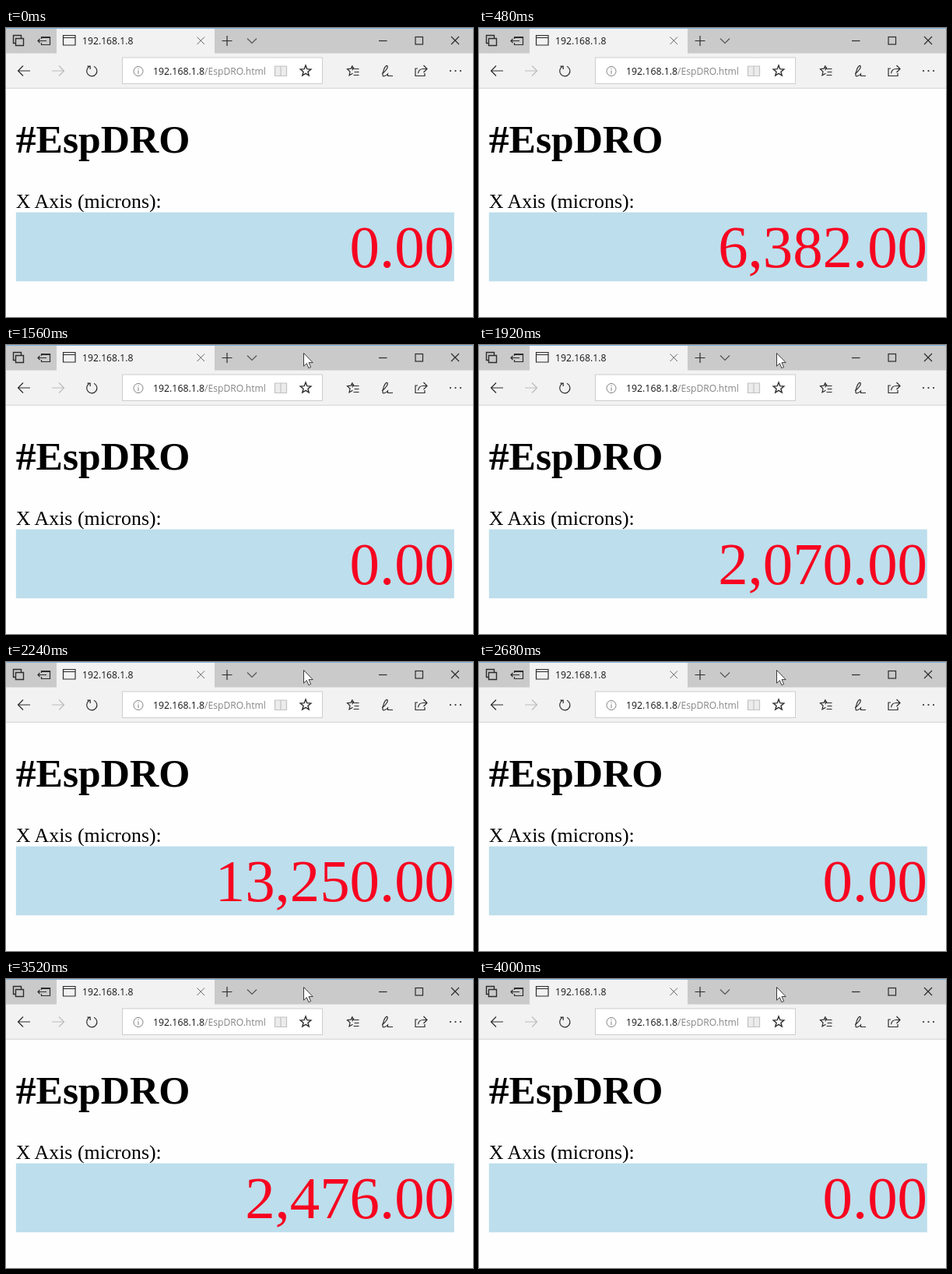
An HTML page for the animation above (4200 ms loop, 600 px wide and 371 px high).

```html
<!DOCTYPE html>
<html lang="en">
<head>
<meta charset="utf-8">
<title>Axis readout</title>
<style>
  html, body { margin: 0; width: 100%; height: 100%; overflow: hidden; background: #fefefe; }
  svg { display: block; width: 600px; height: 371px; }
  .page { font-family: "Liberation Serif", "Times New Roman", serif; fill: #000; }
  .ui { font-family: "Open Sans", "Noto Sans", sans-serif; fill: #151515; }
  .icon { fill: none; stroke: #2c2c2c; stroke-width: 1.2; }
</style>
</head>
<body>
<svg viewBox="0 0 600 371">
  <rect width="600" height="371" fill="#fefefe"/>

  <!-- tab strip -->
  <rect width="600" height="33" fill="#cacaca"/>
  <rect width="600" height="1" fill="#82b3dc"/>
  <rect y="32.5" width="600" height="44.5" fill="#f2f2f2"/>
  <rect x="65" y="1" width="203" height="32" fill="#f2f2f2"/>
  <path d="M0 77.3H600" stroke="#d3d3d3"/>
  <g class="icon">
    <path d="M12.5 13.5H22.5V22.5H12.5ZM12.5 19.5H9.5V9.5H19.5V13.5" stroke-width="1.4"/>
    <path d="M45.5 14V11.5H56.5V21.5H45.5V19M45.5 12.5H56.5M41 16.5H52M43.5 14L41 16.5L43.5 19"/>
    <path d="M73.5 9.5H89V22H73.5ZM73.5 12.5H89"/>
    <path d="M245.5 11.5L255 21M255 11.5L245.5 21" stroke="#666" stroke-width="1"/>
    <path d="M277.5 16.5H290.5M284 10V23"/>
    <path d="M310 13.5L316 19.5L322 13.5" stroke="#555"/>
    <path d="M479 16.5H489.5"/>
    <rect x="526" y="11.5" width="9.5" height="9.5"/>
    <path d="M572 11L582 21M582 11L572 21"/>
  </g>
  <text class="ui" x="98" y="21" font-size="12.2">192.168.1.8</text>

  <!-- toolbar -->
  <rect x="149.5" y="38" width="257" height="33.5" fill="#fff" stroke="#cdcdcd"/>
  <g class="icon">
    <path d="M31 55H15.5M22 48.5L15.5 55L22 61.5"/>
    <path d="M59 55H74.5M68 48.5L74.5 55L68 61.5" stroke="#bcbcbc"/>
    <path d="M107 49.5A6.6 6.6 0 1 0 113 49.2M104.5 49.2H108.2V53"/>
    <g stroke="#808080" stroke-width="1">
      <circle cx="170" cy="55.5" r="6"/>
      <path d="M170 54.3V59M170 51.8V53"/>
    </g>
    <path d="M345.5 49H360.5V61.5H345.5ZM353 49V61.5" fill="#ececec" stroke="#c2c2c2"/>
    <path id="star" stroke-width="1.4"/>
    <path d="M447 50.3L445.3 53.3L445 48.2L443.2 52.2L438.5 52.7L442 56L441 60.8L445.5 58.3M446.5 52.5H453.5M447.5 56.5H453.5M446.5 60.5H453.5"/>
    <path d="M483 58.5C488 56 492 49 489.5 48.3C486.5 48 483.5 58 484 61C484.3 63 489 61 490.5 59V61.5H497"/>
    <path d="M529 52H526V61.5H538V58M529.5 58.3C530 54.3 533 52.5 536 52.5H540.5M536.5 48L541 52.5L536.5 57"/>
  </g>
  <g fill="#2c2c2c">
    <circle cx="571" cy="55" r="1.1"/><circle cx="577.5" cy="55" r="1.1"/><circle cx="584" cy="55" r="1.1"/>
  </g>
  <text class="ui" x="189" y="60" font-size="12.3">192.168.1.8<tspan fill="#858585" font-size="12.1">/EspDRO.html</tspan></text>

  <!-- page -->
  <g class="page">
    <text x="12.8" y="160" font-size="51.6" font-weight="bold">#EspDRO</text>
    <text x="12.8" y="230.6" font-size="25.9">X Axis (microns):</text>
    <rect x="12.8" y="236.6" width="563" height="88.6" fill="#bddeec"/>
    <text id="readout" x="576" y="307" font-size="76.8" text-anchor="end" fill="#f60420">0.00</text>
  </g>

  <path id="cursor" d="M382.5 10.5V27.2L386.3 23.6L388.9 29.6L391.6 28.4L389 22.6H394.2Z" fill="#fff" stroke="#3a3a3a"/>
</svg>
<script>
const LOOP = 4200, TICK = 40, CURSOR_AT = 1360;
const readout = document.getElementById("readout");
const cursor = document.getElementById("cursor");

const linear = p => p;
const easeIn = p => p ** 1.6;
const easeOut = p => 1 - (1 - p) ** 1.6;
const smooth = p => p * p * (3 - 2 * p);

// The readout moves in counted steps: first step, last step, steps, value reached, easing.
const moves = [
  [40, 560, 10, 9120, easeIn],
  [600, 960, 7, 16434, easeOut],
  [1160, 1560, 8, 0, smooth],
  [1840, 2240, 8, 13250, smooth],
  [2360, 2360, 1, 12786, linear],
  [2440, 2680, 5, 0, smooth],
  [3160, 3360, 5, 11300, smooth],
  [3400, 3520, 3, 2476, linear],
  [3560, 3680, 2, -6, easeOut],
  [3760, 3800, 2, -2, linear],
  [4000, 4000, 1, 0, linear]
];

function valueAt(time) {
  let value = 0;
  for (const [start, end, steps, target, ease] of moves) {
    if (time < start) break;
    const gap = steps > 1 ? (end - start) / (steps - 1) : 0;
    let done = 0;
    while (done < steps && time >= start + Math.round(done * gap / TICK) * TICK) done++;
    value += (target - value) * ease(done / steps);
  }
  return Math.round(value);
}

function starPath(cx, cy, outer, inner) {
  const points = Array.from({ length: 10 }, (_, i) => {
    const r = i % 2 ? inner : outer, a = i * Math.PI / 5 - Math.PI / 2;
    return `${(cx + r * Math.cos(a)).toFixed(1)} ${(cy + r * Math.sin(a)).toFixed(1)}`;
  });
  return `M${points.join("L")}Z`;
}

function draw(time) {
  const format = { minimumFractionDigits: 2 };
  readout.textContent = valueAt(time).toLocaleString("en-US", format);
  cursor.style.display = time >= CURSOR_AT ? "" : "none";
}

document.getElementById("star").setAttribute("d", starPath(385, 55.2, 7.2, 3.1));

let origin;
function frame(now) {
  origin ??= now;
  draw((now - origin) % LOOP);
  requestAnimationFrame(frame);
}
draw(0);
requestAnimationFrame(frame);
</script>
</body>
</html>
```
